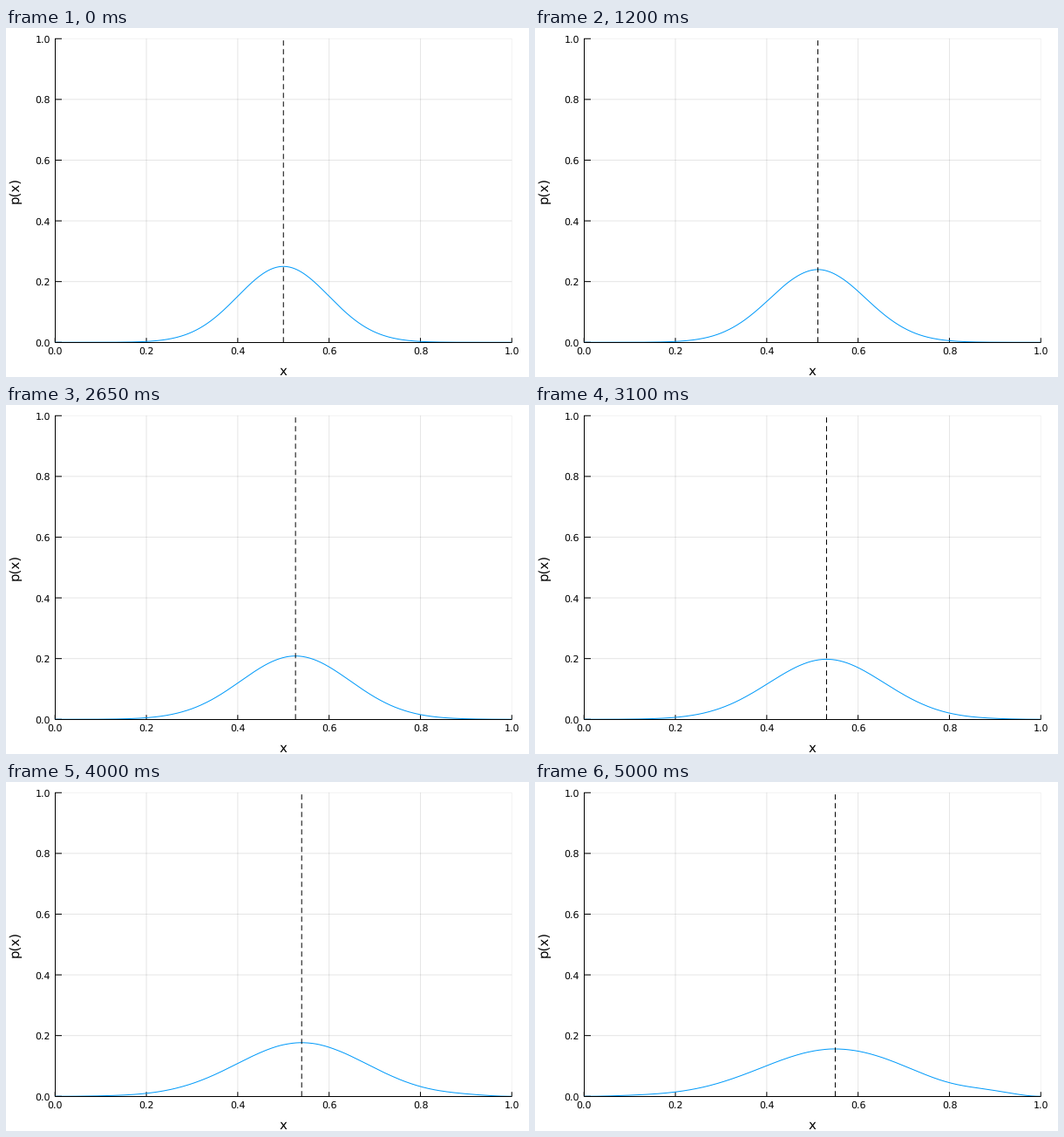
These frames come from a looping animation (600x400 px, 5.05 s). A matplotlib script:

```python
import numpy as np
import matplotlib.pyplot as plt
from matplotlib.animation import FuncAnimation
from matplotlib.patches import Rectangle

W, H, DPI = 600, 400, 100
FRAMES, STEP_MS = 101, 50
LEFT, RIGHT, TOP, BOTTOM = 56.25, 580.25, 12.25, 360.25
PX = 72 / DPI  # one pixel in points

plt.rcParams["font.family"] = "DejaVu Sans"
plt.rcParams["text.hinting"] = "none"
plt.rcParams["text.hinting_factor"] = 1

# Gaussian packet in an infinite well on [0, 1], hbar = m = 1
X0, SIGMA, K0, DT = 0.5, 0.1, 2.0, 0.00025
x = np.linspace(0, 1, 501)
modes = np.arange(1, 81)
basis = np.sin(np.pi * np.outer(x, modes))
psi0 = 0.5 * np.exp(-((x - X0) / (2 * SIGMA)) ** 2 + 1j * K0 * x)
coefs = 2 * (x[1] - x[0]) * (basis.T @ psi0)
energy = (np.pi * modes) ** 2 / 2


def density(t):
    return np.abs(basis @ (coefs * np.exp(-1j * energy * t))) ** 2


def to_x(v):
    return LEFT + (RIGHT - LEFT) * v


def to_y(v):
    return BOTTOM + (TOP - BOTTOM) * v


fig = plt.figure(figsize=(W / DPI, H / DPI), dpi=DPI, facecolor="white")
ax = fig.add_axes([0, 0, 1, 1])
ax.set_xlim(0, W)
ax.set_ylim(H, 0)
ax.axis("off")


def line(xs, ys, color="black", **kw):
    item, = ax.plot(xs, ys, color=color, lw=PX, solid_capstyle="butt",
                    dash_capstyle="butt", **kw)
    item.set_snap(False)
    return item


def label(px, py, text, size, **kw):
    ax.text(px, py, text, fontsize=size * PX, va="baseline", **kw)


ticks = [0.0, 0.2, 0.4, 0.6, 0.8, 1.0]
for v in ticks[1:]:
    alpha = 0.05 if v == 1 else 0.1
    line([to_x(v)] * 2, [TOP, BOTTOM], alpha=alpha)
    line([LEFT, RIGHT], [to_y(v)] * 2, alpha=alpha)

line([56.5, 56.5], [12, 361])
line([56, 580.5], [360.5, 360.5])
for v in ticks:
    line([to_x(v)] * 2, [BOTTOM, 355.2])
    line([LEFT, 64], [to_y(v)] * 2)
    label(to_x(v) + 0.2, 374.1, f"{v:.1f}", 10.6, ha="center")
    label(50.8, to_y(v) + 4.4, f"{v:.1f}", 10.6, ha="right")

label(318.2, 397.8, "x", 14.67, ha="center")
ax.text(14.7, 185.8, "p(x)", fontsize=14.67 * PX, rotation=90,
        ha="right", va="center", rotation_mode="default").set_visible(False)
ax.text(14.7, 185.8, "p(x)", fontsize=14.67 * PX, rotation=90,
        rotation_mode="anchor", ha="center", va="baseline")

curve = line([], [], color="#009afa")
curve.set_clip_path(Rectangle((56, 12), 524, 348, transform=ax.transData))
marker = line([], [], dashes=(6, 4))


def update(k):
    t = k * DT
    curve.set_data(to_x(x), to_y(density(t)))
    marker.set_data([to_x(X0 + K0 * t)] * 2, [BOTTOM, TOP])
    return curve, marker


anim = FuncAnimation(fig, update, frames=FRAMES, interval=STEP_MS,
                     init_func=lambda: update(0), repeat=True, repeat_delay=0)
plt.show()
```
